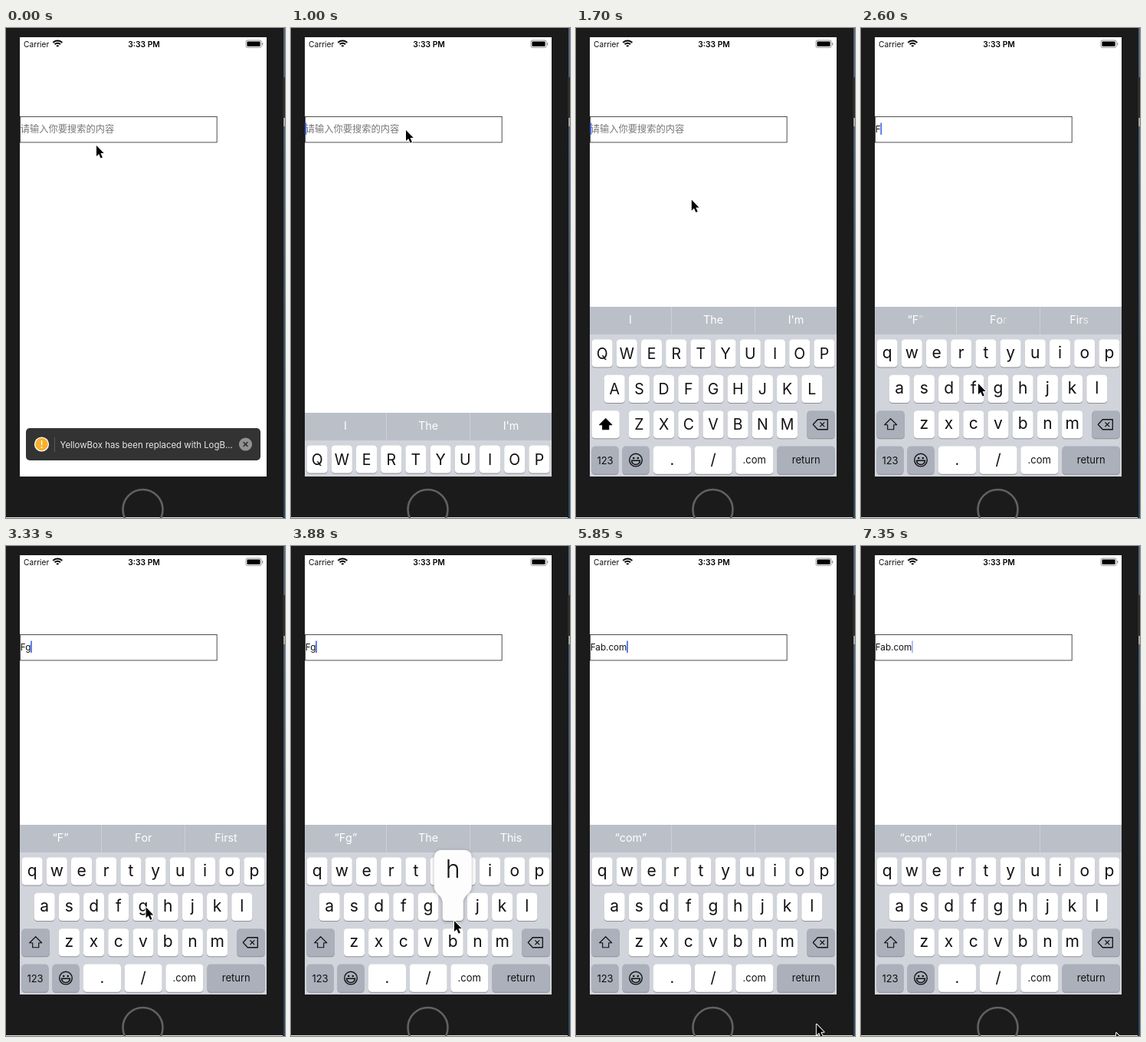
Write an HTML page with a canvas that moves like this. It is 364 by 638 pixels and loops after 7450 ms.

```html
<!DOCTYPE html>
<html lang="zh">
<head>
<meta charset="utf-8">
<title>Phone search input</title>
<style>
html, body { margin: 0; width: 100%; height: 100%; overflow: hidden; background: #1b1b1b; }
canvas { display: block; width: 364px; height: 638px; }
</style>
</head>
<body>
<canvas id="stage"></canvas>
<script>
const W = 364, H = 638, LOOP = 7450;
const canvas = document.getElementById('stage');
const ctx = canvas.getContext('2d');
const dpr = window.devicePixelRatio || 1;
canvas.width = W * dpr;
canvas.height = H * dpr;

const SANS = 'Inter, "Noto Sans CJK SC", "Noto Sans CJK", sans-serif';
const PT = 322 / 375; // phone points to pixels
const MID = 179, BOTTOM = 584, TOP = 363, BAR = 36;
const KEY_H = 42 * PT, KEY_W = 31.5 * PT, PITCH = 37.5 * PT, ROW = 54 * PT;
const WIDE_W = 49, WIDE_PITCH = 53.65;
const ROWS = ['qwertyuiop', 'asdfghjkl', 'zxcvbnm'];
const WIDE = ['.', '/', '.com'];
const INK = '#111', GREY = '#abb0bb';
const FOCUS = 1000, SELECT = 4360;

// Where the pointer goes, and what it presses there.
const START = { x: 118, y: 153 };
const STOPS = [
  { x: 150, y: 133, leave: 0, arrive: 380 },
  { x: 153, y: 463, leave: 1400, arrive: 1980, key: 'f', down: 2450, up: 2600,
    text: 'F', hintAt: 2480, hints: ['“F”', 'For', 'First'] },
  { x: 182, y: 470, leave: 2720, arrive: 2960, key: 'g', down: 3100, up: 3250,
    text: 'Fg', hintAt: 3350, hints: ['“Fg”', 'The', 'This'] },
  { x: 213, y: 488, leave: 3250, arrive: 3610, key: 'h', down: 3880, up: 4120,
    text: 'Fgh', hintAt: 4180, hints: ['“Fgh”', 'Fab', 'Fighting'] },
  { x: 229, y: 573, leave: 4120, arrive: 4730, key: '.com', down: 5000, up: 5270,
    text: 'Fab.com', hintAt: 5350, hints: ['“com”', '', ''] },
  { x: 333, y: 634, leave: 5270, arrive: 6000 },
];
const PRESSES = STOPS.filter(s => s.key);
const IDLE = { up: FOCUS, text: '', hintAt: 0, hints: ['I', 'The', 'I\'m'] };

const ARROW = new Path2D('M0 0V14L3.2 11L5.6 16.4L7.9 15.4L5.5 10.1H9.7Z');
const SHIFT = new Path2D('M0 -7.5L8 .5H4V6.5H-4V.5H-8Z');
const DELETE = new Path2D('M-10 0L-4 -6.5H9V6.5H-4Z');

const clamp = v => Math.min(1, Math.max(0, v));
const smooth = v => v * v * (3 - 2 * v);
const latest = (t, field) => PRESSES.filter(p => p[field] <= t).pop() || IDLE;
const beat = t => Math.max(0, FOCUS + 120 * Math.floor((t - FOCUS) / 120));

function rect(x, y, w, h, fill) {
  ctx.fillStyle = fill;
  ctx.fillRect(x, y, w, h);
}

function round(x, y, w, h, r, fill) {
  ctx.beginPath();
  ctx.roundRect(x, y, w, h, r);
  ctx.fillStyle = fill;
  ctx.fill();
}

function disc(x, y, r, fill) {
  ctx.beginPath();
  ctx.arc(x, y, r, 0, 7);
  ctx.fillStyle = fill;
  ctx.fill();
}

function arc(x, y, r, from, to, color, width) {
  ctx.beginPath();
  ctx.arc(x, y, r, from, to);
  ctx.strokeStyle = color;
  ctx.lineWidth = width;
  ctx.stroke();
}

function cross(x, y, r, color, width) {
  ctx.beginPath();
  for (const s of [-r, r]) {
    ctx.moveTo(x - r, y - s);
    ctx.lineTo(x + r, y + s);
  }
  ctx.strokeStyle = color;
  ctx.lineWidth = width;
  ctx.stroke();
}

function icon(path, x, y, line, width, fill) {
  ctx.save();
  ctx.translate(x, y);
  ctx.lineJoin = 'round';
  ctx.strokeStyle = line;
  ctx.lineWidth = width;
  ctx.stroke(path);
  if (fill) {
    ctx.fillStyle = fill;
    ctx.fill(path);
  }
  ctx.restore();
}

function text(str, x, y, size, color, align = 'left', weight = 400) {
  ctx.font = `${weight} ${size}px ${SANS}`;
  ctx.textAlign = align;
  ctx.fillStyle = color;
  ctx.fillText(str, x, y);
}

function drawPhone() {
  rect(0, 0, W, H, '#1b1b1b');
  const sea = ctx.createLinearGradient(0, 0, 0, H);
  sea.addColorStop(0, '#53677d');
  sea.addColorStop(1, '#2d465e');
  rect(362, 0, 2, H, sea);
  rect(361, 64, 3, 53, '#2d2d2d');
  rect(362, 117, 2, 11, '#a5a5a5');
  rect(0, 637, 361, 1, '#e6e6e6');
  arc(178.5, 627, 26, 0, 7, '#616161', 2.6);
  rect(18, 12, 322, 572, '#fff');
}

function drawStatus() {
  text('Carrier', 23, 24.5, 10.2, INK);
  text('3:33 PM', 180, 24.5, 10.3, '#000', 'center', 600);
  for (const r of [8.5, 5.2, 1.8]) {
    arc(67.3, 25, r, -Math.PI * 0.75, -Math.PI * 0.25, '#000', 2);
  }
  round(312.5, 15.5, 21, 10.5, 3, '#999');
  round(313.4, 16.4, 19.2, 8.7, 2.2, '#fff');
  round(314.4, 17.4, 17.2, 6.7, 1.3, '#000');
  round(334, 19, 1.3, 3.6, 0.6, '#999');
}

function caretAlpha(t) {
  const s = t - latest(t, 'up').up;
  if (s < 0) return 0;
  return s < 745 ? 1 : clamp(0.5 + 1.5 * Math.cos((s - 745) / 1070 * 2 * Math.PI));
}

function drawField(t) {
  const str = latest(t, 'up').text;
  const selected = str === 'Fgh' && t >= SELECT;
  if (selected) rect(18, 123, 23.5, 17, '#c3d9ee');
  if (str) text(str, 18.7, 136.3, 11.7, INK);
  else text('请输入你要搜索的内容', 18.7, 136, 12.25, '#777');
  const width = str ? ctx.measureText(str).width : 0;
  ctx.strokeStyle = '#333';
  ctx.lineWidth = PT;
  ctx.strokeRect(18.43, 115.43, 299 * PT, 39 * PT);
  if (selected) return;
  ctx.globalAlpha = caretAlpha(t);
  rect(18.5 + width, 123.5, 2 * PT, 18 * PT, '#426bf2');
  ctx.globalAlpha = 1;
}

function drawWarning() {
  round(26, 521, 306, 42, 5, '#333');
  disc(46.5, 542, 9.6, '#fff');
  disc(46.5, 542, 8.3, '#f9b02e');
  rect(45.9, 537, 1.3, 6.2, '#fff');
  disc(46.5, 546, 0.9, '#fff');
  rect(63, 533, 1, 19, '#585858');
  text('YellowBox has been replaced with LogB...', 70.5, 546.5, 11.45, '#e8e8e8');
  disc(312.5, 542, 8.6, '#929292');
  cross(312.5, 542, 2.9, '#333', 1.5);
}

function keyCap(x, y, w, fill = '#fff') {
  round(x, y + 1, w, KEY_H, 4.3, '#8d9097');
  round(x, y, w, KEY_H, 4.3, fill);
}

const rowY = (y, i) => y + BAR + 6.5 + i * ROW;
const keyX = (row, i) => MID + (i - (row.length - 1) / 2) * PITCH;
const wideX = i => 101 + i * WIDE_PITCH + WIDE_W / 2;

function drawHints(t, y) {
  const { hints, hintAt } = latest(t, 'hintAt');
  const hot = hints[1] === 'Fab' && t >= SELECT;
  rect(18, y, 322, BAR, '#bbbfc8');
  if (hot) rect(124.5, y, 109, BAR, '#ebedf0');
  else for (const x of [124, 233]) rect(x, y, 1, BAR, '#cdd0d7');
  hints.forEach((word, col) => {
    ctx.font = `400 14.3px ${SANS}`;
    let x = MID + (col - 1) * 108 - ctx.measureText(word).width / 2;
    // Letters appear one after another.
    const shown = (t - hintAt) / 200 * (word.length + 1);
    [...word].forEach((ch, i) => {
      ctx.globalAlpha = clamp(shown - i);
      text(ch, x, y + 22, 14.3, hot && col === 1 ? '#1b7af0' : '#fff');
      x += ctx.measureText(ch).width;
    });
    ctx.globalAlpha = 1;
  });
}

function drawPopup(label, upper) {
  const row = ROWS.findIndex(r => r.includes(label));
  const wide = row < 0;
  const mid = wide ? wideX(WIDE.indexOf(label)) : keyX(ROWS[row], ROWS[row].indexOf(label));
  const half = (wide ? WIDE_W : KEY_W) / 2;
  const y = rowY(TOP, wide ? 3 : row);
  const x0 = mid - half, x1 = mid + half, left = x0 - 11, right = x1 + 11;
  const top = y - 56, neck = y - 9, bend = y + 2, base = y + 13, foot = y + KEY_H;
  ctx.save();
  ctx.beginPath();
  ctx.moveTo(x0, base);
  ctx.bezierCurveTo(x0, bend, left, bend, left, neck);
  ctx.arcTo(left, top, mid, top, 9);
  ctx.arcTo(right, top, right, neck, 9);
  ctx.lineTo(right, neck);
  ctx.bezierCurveTo(right, bend, x1, bend, x1, base);
  ctx.arcTo(x1, foot, mid, foot, 4.3);
  ctx.arcTo(x0, foot, x0, base, 4.3);
  ctx.closePath();
  ctx.shadowColor = 'rgba(0,0,0,.3)';
  ctx.shadowBlur = 4 * dpr;
  ctx.shadowOffsetY = dpr;
  ctx.fillStyle = '#fdfdfd';
  ctx.fill();
  ctx.restore();
  if (wide) text(label, mid, y - 25, 16.4, INK, 'center');
  else text(upper ? label.toUpperCase() : label, mid, y - 20, 32, INK, 'center', 300);
}

function smiley(x, y) {
  arc(x, y, 8.3, 0, 7, INK, 1.4);
  for (const s of [-2.8, 2.8]) disc(x + s, y - 2.6, 1.3, INK);
  ctx.beginPath();
  ctx.arc(x, y + 0.6, 5.4, 0, Math.PI);
  ctx.closePath();
  ctx.lineWidth = 1.5;
  ctx.stroke();
}

function drawKeyboard(t) {
  const y = Math.round(TOP + 138 * Math.exp((FOCUS - beat(t)) / 77));
  const upper = t < PRESSES[0].up;
  rect(18, y, 322, BOTTOM - y, '#d1d4da');
  drawHints(t, y);
  ROWS.forEach((row, r) => [...row].forEach((ch, i) => {
    const x = keyX(row, i), top = rowY(y, r);
    keyCap(x - KEY_W / 2, top, KEY_W);
    if (upper) text(ch.toUpperCase(), x, top + 25.2, 19.5, INK, 'center');
    else text(ch, x, top + 24, 21, INK, 'center');
  }));

  const third = rowY(y, 2), last = rowY(y, 3);
  keyCap(20.5, third, 36.3, upper ? '#fff' : GREY);
  icon(SHIFT, 38.7, third + 18, INK, 1.2, upper && '#000');
  keyCap(301.3, third, 36.3, GREY);
  icon(DELETE, 319.3, third + 18, INK, 1.3);
  cross(321.3, third + 18, 2.9, INK, 1.3);

  keyCap(20.5, last, 35, GREY);
  text('123', 38, last + 23, 13, INK, 'center');
  keyCap(60.5, last, 35, GREY);
  smiley(78, last + 18);
  WIDE.forEach((label, i) => {
    const single = label.length === 1;
    keyCap(wideX(i) - WIDE_W / 2, last, WIDE_W);
    text(label, wideX(i), last + (single ? 24.5 : 22.5), single ? 20 : 13, INK, 'center');
  });
  keyCap(262.5, last, 75.3, GREY);
  text('return', 300.2, last + 22.5, 13, INK, 'center');

  const press = PRESSES.find(p => t >= p.down && t < p.up);
  if (press) drawPopup(press.key, upper);
}

function drawPointer(t) {
  let { x, y } = START;
  for (const s of STOPS) {
    const k = smooth(clamp((t - s.leave) / (s.arrive - s.leave)));
    x += (s.x - x) * k;
    y += (s.y - y) * k;
  }
  icon(ARROW, x, y, '#fff', 2, '#000');
}

function draw(t) {
  ctx.setTransform(dpr, 0, 0, dpr, 0, 0);
  drawPhone();
  ctx.save();
  ctx.beginPath();
  ctx.rect(18, 12, 322, 572);
  ctx.clip();
  drawStatus();
  drawField(t);
  if (t < FOCUS) drawWarning();
  else drawKeyboard(t);
  ctx.restore();
  drawPointer(beat(t));
}

const start = performance.now();
function loop() {
  draw(Math.max(0, performance.now() - start) % LOOP);
  requestAnimationFrame(loop);
}
loop();
</script>
</body>
</html>
```
